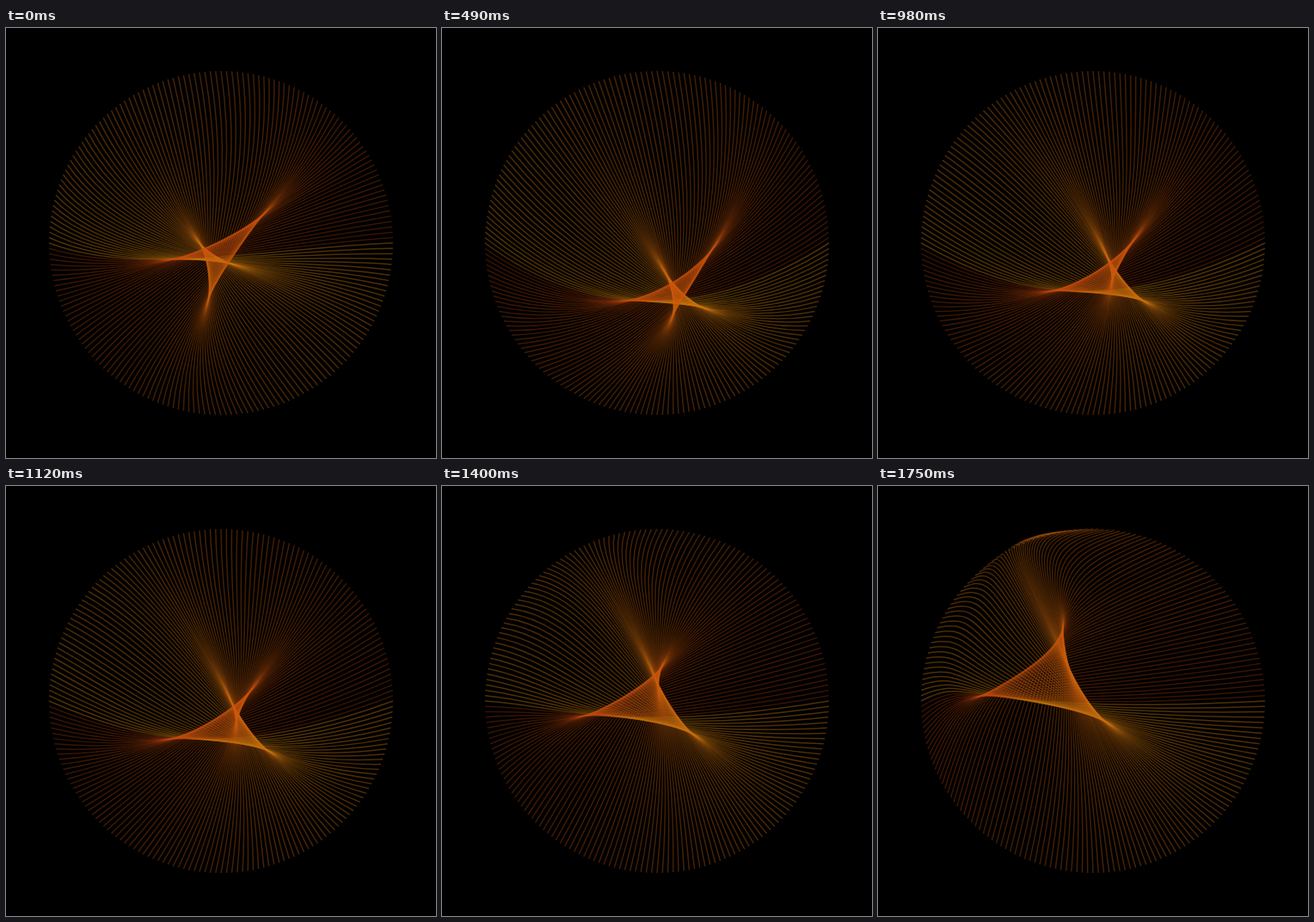
Animation of 500 by 500 pixels, one loop 1820 ms. Source, as an HTML page with a canvas:

```html
<!DOCTYPE html>
<html lang="en">
<head>
<meta charset="utf-8">
<title>Threads in a ring</title>
<style>
  html, body { margin: 0; width: 100%; height: 100%; overflow: hidden; background: #000; }
  canvas { display: block; width: 500px; height: 500px; }
</style>
</head>
<body>
<canvas id="stage" width="500" height="500"></canvas>
<script>
const { sin, cos, PI, floor } = Math;
const ctx = document.getElementById("stage").getContext("2d");
const SIZE = 500, RADIUS = 200, THREADS = 100;
const STEP = 70, STEPS = 26;
const RIPPLE = 12, RIPPLE_PHASE = 0.44;

// Point the handles drift around; u runs from 0 to 1 over the loop.
function drift(u) {
  return [19 - 276 * (u - 0.34) ** 2, 80 * cos(3.8 * (u - 0.3)) - 15];
}

// Bezier handle of the rim point at angle a: a few slowly changing waves
// around the ring, plus a small ripple along the rim that gathers threads.
function handle(a, u) {
  const [cx, cy] = drift(u), swell = sin(PI * u);
  const ripple = -RIPPLE * sin(5 * (a - RIPPLE_PHASE));
  const x = cx
    + (71 - 82 * u ** 3) * cos(a) + (42 * u - 19) * sin(a)
    - (10 + 36 * u) * cos(2 * a) - 15 * sin(2 * a)
    + (20 - 50 * u) * sin(3 * a);
  const y = cy
    + (43 * u - 11) * cos(a) + (26 + 20 * swell) * sin(a)
    + (74 * u - 5) * cos(2 * a) + (3 - 30 * u) * sin(2 * a)
    - 6 * cos(3 * a) + 20 * swell * sin(3 * a);
  return [x - ripple * sin(a), y + ripple * cos(a)];
}

function draw(u) {
  ctx.setTransform(1, 0, 0, 1, 0, 0);
  ctx.fillStyle = "#000";
  ctx.fillRect(0, 0, SIZE, SIZE);
  ctx.translate(SIZE / 2, SIZE / 2);
  ctx.lineWidth = 1.5;
  for (let i = 0; i < THREADS; i++) {
    const f = i / THREADS, a = f * PI;
    const x = RADIUS * cos(a), y = RADIUS * sin(a);
    ctx.strokeStyle = `hsla(${35 - 17 * f}, 86%, 43%, ${0.39 - 0.12 * f})`;
    ctx.beginPath();
    ctx.moveTo(x, y);
    ctx.bezierCurveTo(...handle(a, u), ...handle(a + PI, u), -x, -y);
    ctx.stroke();
  }
}

function tick() {
  const step = floor(performance.now() / STEP) % STEPS;
  draw(step / (STEPS - 1));
  requestAnimationFrame(tick);
}
tick();
</script>
</body>
</html>
```
